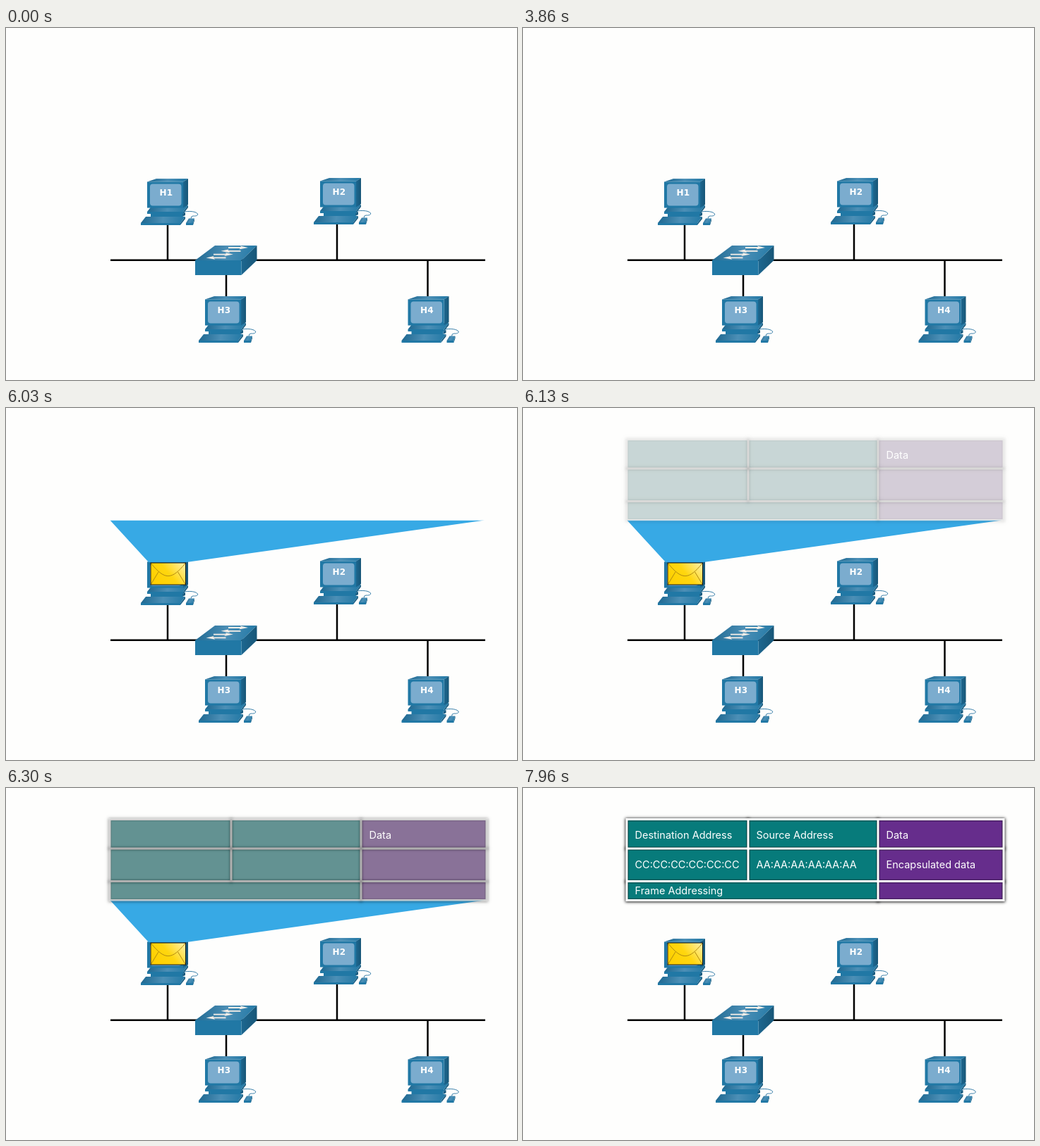
An HTML page with a canvas that plays this animation: 724x500 px, repeating every 8 s.

```html
<!DOCTYPE html>
<html lang="en">
<head>
<meta charset="utf-8">
<title>Sending a frame on a switched network</title>
<style>
html, body { margin: 0; width: 724px; height: 500px; overflow: hidden; background: #fefefd; }
canvas { display: block; }
</style>
</head>
<body>
<canvas id="stage" width="724" height="500"></canvas>
<script>
const ctx = document.getElementById('stage').getContext('2d');
const LOOP = 8000;
const BLUE = '#2178a5', DARK = '#185677', LIGHT = '#4c8fb6', EDGE = '#1d6790';
const BUS = 329.8;
const ramp = (t, from, to) => Math.max(0, Math.min(1, (t - from) / (to - from)));

function grad(x0, y0, x1, y1, ...colors) {
  const g = ctx.createLinearGradient(x0, y0, x1, y1);
  colors.forEach((c, i) => g.addColorStop(i / (colors.length - 1), c));
  return g;
}

function poly(fill, ...points) {
  ctx.beginPath();
  for (const [x, y] of points) ctx.lineTo(x, y);
  ctx.closePath();
  ctx.fillStyle = fill;
  ctx.fill();
}

function wire(x0, y0, x1, y1) {
  ctx.beginPath();
  ctx.moveTo(x0, y0);
  ctx.lineTo(x1, y1);
  ctx.strokeStyle = '#000';
  ctx.lineWidth = 2.5;
  ctx.stroke();
}

function text(str, x, y, font, color = '#fff', align = 'left') {
  ctx.font = font;
  ctx.textAlign = align;
  ctx.fillStyle = color;
  ctx.fillText(str, x, y);
}

// Box seen from above: lid of the given depth, front of height h, right side.
function slab(x, y, w, depth, h, skew, lean = skew) {
  const r = x + w, front = y + depth, back = r + skew;
  poly(grad(x, y, back, front, EDGE, LIGHT, BLUE), [x, front], [x + lean, y], [back, y], [r, front]);
  poly(grad(r, 0, back, 0, EDGE, DARK), [r, front], [back, y], [back, y + h], [r, front + h]);
  poly(BLUE, [x, front], [r, front], [r, front + h], [x, front + h]);
}

// Drawn with its left edge and top at the origin.
function computer(x, y, label) {
  ctx.save();
  ctx.translate(x, y);
  ctx.beginPath();
  ctx.moveTo(61, 47);
  ctx.bezierCurveTo(82, 44, 86, 54, 74, 53);
  ctx.quadraticCurveTo(71, 53, 71, 57);
  ctx.strokeStyle = '#3a80aa';
  ctx.lineWidth = 1;
  ctx.stroke();
  slab(14, 48, 45, 2, 4, 4);
  slab(9, 38, 51, 9, 3, 7);
  slab(0, 54, 56, 9, 3, 7);
  slab(64, 56.5, 10, 6.5, 3, 2, 4);
  slab(9, 0, 51, 4.5, 37, 7, 13);
  ctx.beginPath();
  ctx.roundRect(13, 7.5, 44.5, 31, 4);
  ctx.fillStyle = '#7bacce';
  ctx.fill();
  text(label, 35.8, 24, 'bold 12px "DejaVu Sans", sans-serif', '#fff', 'center');
  ctx.restore();
}

function networkSwitch() {
  slab(268, 309, 65.5, 21, 21, 22, 28);
  for (let i = 0; i < 4; i++) {
    ctx.save();
    ctx.translate(329 - 10.5 * i, 312 + 4.8 * i);
    if (i % 2) ctx.scale(-1, 1);
    poly('#f9efe8', [-14, -0.9], [4, -0.9], [3, -2.4], [14, 0], [1, 2.4], [3, 0.9], [-14, 0.9]);
    ctx.restore();
  }
}

function network() {
  wire(148, BUS, 679, BUS);
  wire(229, 279, 229, BUS);
  wire(469, 279, 469, BUS);
  wire(312, BUS, 312, 382);
  wire(597.5, BUS, 597.5, 382);
  computer(191, 214, 'H1');
  computer(436, 213, 'H2');
  computer(273, 381, 'H3');
  computer(560.5, 381, 'H4');
  networkSwitch();
}

function bubble() {
  const font = '15.6px "Liberation Sans", Arial, sans-serif';
  ctx.save();
  ctx.shadowColor = 'rgba(0,0,0,.4)';
  ctx.shadowBlur = 4;
  ctx.shadowOffsetY = 1;
  poly('#fff', [158, 240], [178, 255], [158, 256]);
  ctx.beginPath();
  ctx.roundRect(10, 218, 149, 64, 6);
  ctx.fill();
  ctx.restore();
  ctx.strokeStyle = '#243b66';
  ctx.lineWidth = 1.5;
  ctx.stroke();
  text('I need to send', 16, 239, font, '#222');
  text('information to H3.', 16, 264, font, '#222');
}

function envelope() {
  const w = 49.5, h = 31;
  ctx.save();
  ctx.translate(205, 220);
  ctx.fillStyle = grad(8, h, w - 5, 0, '#ffd000', '#ffd60f', '#ffee9c');
  ctx.fillRect(0, 0, w, h);
  ctx.lineWidth = 1;
  ctx.strokeStyle = '#b18a10';
  ctx.beginPath();
  ctx.moveTo(0, 0);
  ctx.bezierCurveTo(w * 0.4, h * 0.8, w * 0.6, h * 0.8, w, 0);
  for (const side of [0, 1]) {
    ctx.moveTo(w * side, h);
    ctx.lineTo(w * (0.22 + 0.56 * side), h * 0.42);
  }
  ctx.stroke();
  ctx.strokeStyle = '#1c1a10';
  ctx.strokeRect(0, 0, w, h);
  ctx.restore();
}

function beam(grown) {
  const top = 159.5, bottom = 219, h = (bottom - top) * grown;
  ctx.save();
  ctx.beginPath();
  ctx.rect(0, bottom - h, 724, h);
  ctx.clip();
  poly('#37a9e5', [147.5, top], [678, top], [256, bottom], [202, bottom]);
  ctx.restore();
}

const cols = [147, 319, 503, 681], rows = [44.5, 86, 132.5, 159.5];
const baselines = [72, 113.5, 151];
const words = [
  ['Destination Address', 'Source Address', 'Data'],
  ['CC:CC:CC:CC:CC:CC', 'AA:AA:AA:AA:AA:AA', 'Encapsulated data'],
  ['Frame Addressing', null, '']
];

// Cells of the table; null joins a cell to the one on its left.
const cells = words.flatMap((row, r) => row.flatMap((str, c) => {
  if (str === null) return [];
  const end = row[c + 1] === null ? c + 2 : c + 1;
  return [{
    str, x: cols[c], y: rows[r], w: cols[end] - cols[c], h: rows[r + 1] - rows[r],
    base: baselines[r], color: c === 2 ? '#662d8c' : '#077b7b'
  }];
}));

function table(alpha, textAlpha) {
  // shadows alone, cast by boxes outside the stage
  ctx.save();
  ctx.shadowColor = `rgba(0,0,0,${0.92 * alpha})`;
  ctx.shadowBlur = 4;
  ctx.shadowOffsetX = 2000;
  for (const c of cells) ctx.fillRect(c.x - 2002, c.y - 2, c.w + 4, c.h + 4);
  ctx.restore();

  ctx.save();
  ctx.globalAlpha = alpha;
  ctx.lineWidth = 1.5;
  ctx.strokeStyle = 'rgba(0,0,0,.28)';
  for (const c of cells) {
    ctx.fillStyle = c.color;
    ctx.fillRect(c.x + 1.5, c.y + 1.5, c.w - 3, c.h - 3);
    ctx.strokeRect(c.x + 2.2, c.y + 2.2, c.w - 4.4, c.h - 4.4);
  }
  ctx.beginPath();
  for (const c of cells) ctx.rect(c.x, c.y, c.w, c.h);
  ctx.strokeStyle = '#fff';
  ctx.lineWidth = 3;
  ctx.stroke();
  ctx.restore();

  ctx.save();
  for (const c of cells) {
    ctx.globalAlpha = c.str === 'Data' ? 1 : textAlpha;
    text(c.str, c.x + 11.5, c.base, '14.5px Inter, sans-serif');
  }
  ctx.restore();
}

function draw(t) {
  ctx.fillStyle = '#fefefd';
  ctx.fillRect(0, 0, 724, 500);
  network();
  if (t >= 760 && t < 3860) bubble();
  if (t >= 5730 && t < 7960) beam(ramp(t, 5730, 6030));
  if (t >= 4730) envelope();
  if (t > 6060) table(ramp(t, 6060, 6670), ramp(t, 6530, 6700));
}

const start = performance.now();
function tick() {
  draw((performance.now() - start) % LOOP);
  requestAnimationFrame(tick);
}
tick();
</script>
</body>
</html>
```
